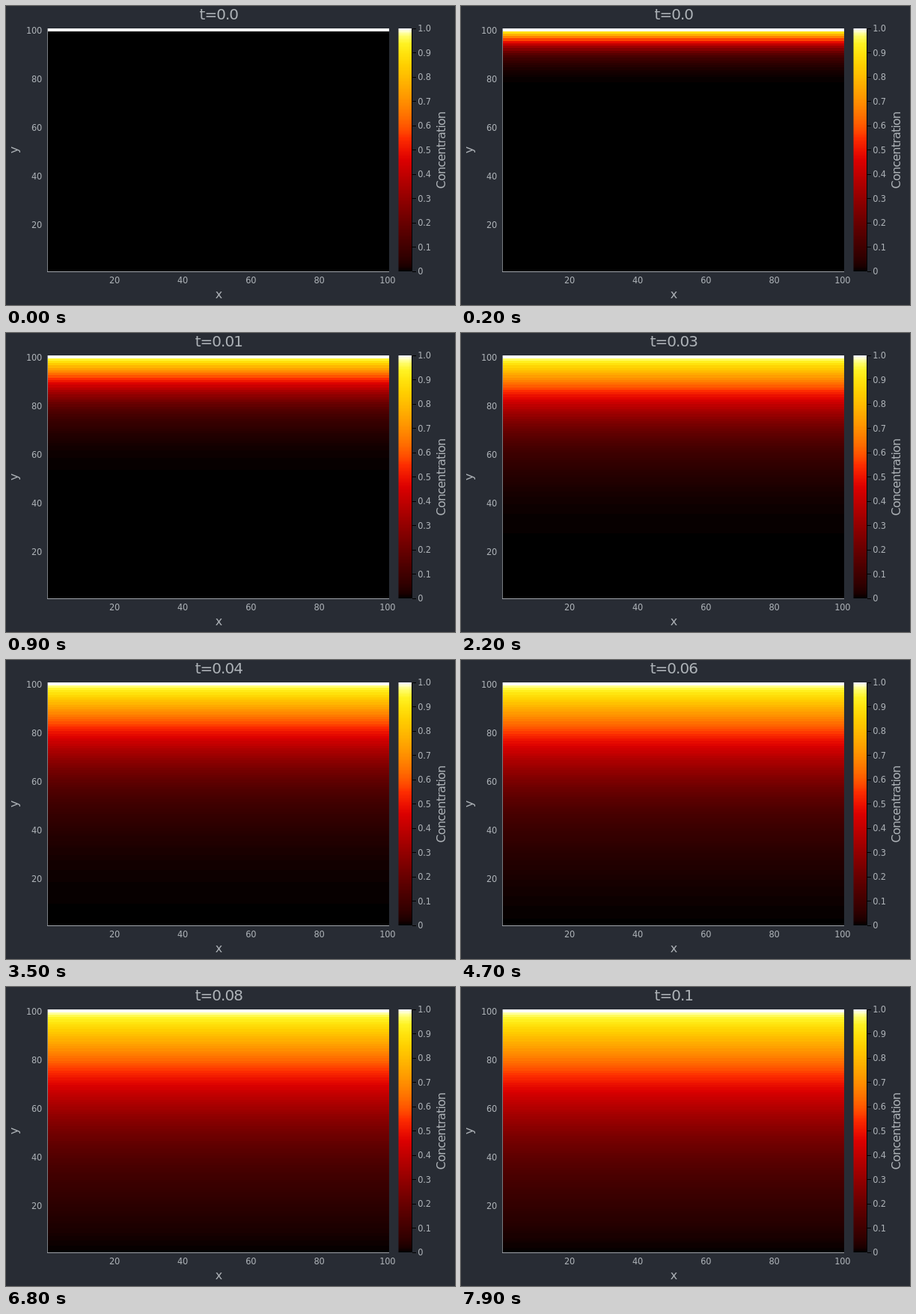
Write an HTML page with a canvas that moves like this. It is 600 px wide and 400 px high and loops after 8 s.

```html
<!DOCTYPE html>
<html lang="en">
<head>
<meta charset="utf-8">
<title>Diffusion</title>
<style>
  html, body { margin: 0; width: 100%; height: 100%; overflow: hidden; background: #282c34; }
  canvas, svg { position: absolute; left: 0; top: 0; width: 600px; height: 400px; }
  text { font-family: "DejaVu Sans", sans-serif; font-size: 11.4px; letter-spacing: -0.02em; fill: #adb2b7; }
  .guide { font-size: 16px; letter-spacing: -0.05em; }
  .title { font-size: 20px; letter-spacing: -0.05em; }
  .mid { text-anchor: middle; }
  .end { text-anchor: end; }
</style>
</head>
<body>
<canvas width="600" height="400"></canvas>
<svg viewBox="0 0 600 400">
  <path d="M55.5 30V355" stroke="#adb2b7" stroke-opacity="0.6"/>
  <path d="M55 355.5H512" stroke="#adb2b7" stroke-opacity="0.9"/>
  <path id="ticks" fill="none" stroke="#000"/>
  <text id="title" class="title mid" x="284.3" y="18"></text>
  <text class="guide mid" x="284" y="391">x</text>
  <text class="guide mid" transform="translate(16 193) rotate(-90)">y</text>
  <text class="guide mid" transform="translate(587 193) rotate(-90)">Concentration</text>
</svg>
<script>
const STEP = 100, FRAMES = 80, N = 100, SUBSTEPS = 50;
const LEFT = 56, RIGHT = 512, TOP = 30.4, HEIGHT = 325;
const svg = document.querySelector('svg');
const title = document.getElementById('title');
const ctx = document.querySelector('canvas').getContext('2d');

// Black-red-yellow-white ramp whose lightness rises evenly with the value.
const toLinear = c => {
  c /= 255;
  return c <= 0.04045 ? c / 12.92 : ((c + 0.055) / 1.055) ** 2.4;
};
const toByte = l => {
  l = Math.min(1, Math.max(0, l));
  return 255 * (l <= 0.0031308 ? 12.92 * l : 1.055 * l ** (1 / 2.4) - 0.055);
};
function lerpPoints(points, v) {
  const i = points.findIndex(p => v <= p[0]);
  if (i <= 0) return points[0][1];
  const [a, b] = [points[i - 1], points[i]];
  return a[1] + (b[1] - a[1]) * (v - a[0]) / (b[0] - a[0]);
}
const RED = [[0.45, 216], [0.5, 237], [0.55, 254], [0.6, 255], [1, 255]];
const BLUE = [[0.85, 0], [0.9, 13], [0.94, 36], [0.97, 105], [1, 255]];

function fire(v) {
  const L = v * 100;
  const Y = L > 8 ? ((L + 16) / 116) ** 3 : L / 903.3;
  if (v <= RED[0][0]) return [toByte(Y / 0.2126), 0, 0];
  const r = lerpPoints(RED, v), b = lerpPoints(BLUE, v);
  const g = toByte((Y - 0.2126 * toLinear(r) - 0.0722 * toLinear(b)) / 0.7152);
  return [r, g, b];
}
const palette = Array.from({ length: 256 }, (_, i) => `rgb(${fire(i / 255).map(Math.round)})`);
const colour = v => palette[Math.round(v * 255)];

// Explicit diffusion: fixed 1 at the top, fixed 0 at the bottom.
function diffuse(start) {
  let c = start;
  for (let s = 0; s < SUBSTEPS; s++) {
    const next = c.slice();
    for (let i = 1; i < N - 1; i++) next[i] = c[i] + 0.25 * (c[i - 1] - 2 * c[i] + c[i + 1]);
    c = next;
  }
  return c;
}
const states = [Array.from({ length: N }, (_, i) => i ? 0 : 1)];
while (states.length < FRAMES) states.push(diffuse(states[states.length - 1]));

// Each frame advances t by 0.00125; halves round to even.
function timeLabel(n) {
  const x = n / 8, low = Math.floor(x), rest = x - low;
  const h = rest === 0.5 ? low + low % 2 : Math.round(x);
  return 't=' + (h ? h / 100 : '0.0');
}

function addText(str, x, y, cls) {
  const el = document.createElementNS('http://www.w3.org/2000/svg', 'text');
  el.setAttribute('x', x);
  el.setAttribute('y', y);
  el.setAttribute('class', cls);
  el.textContent = str;
  svg.append(el);
}

function drawAxes() {
  for (let v = 20; v <= 100; v += 20) {
    addText(v, LEFT + (v - 0.5) * 4.56, 371, 'mid');
    addText(v, 48, TOP + (N + 0.5 - v) * 3.25 + 5, 'end');
  }
  let d = 'M542.5 30V355';
  for (let i = 0; i <= 10; i++) {
    const y = 355 - i * 32.5;
    addText(i ? (i / 10).toFixed(1) : '0', 550.3, y + 4.2, '');
    d += `M543 ${Math.floor(y) + 0.5}h5`;
  }
  document.getElementById('ticks').setAttribute('d', d);
  for (let y = 0; y < HEIGHT; y++) {
    ctx.fillStyle = colour(1 - y / (HEIGHT - 1));
    ctx.fillRect(524.5, 30 + y, 18, 1);
  }
}

function drawFrame(n) {
  const edge = i => Math.round(TOP + i * HEIGHT / N);
  states[n].forEach((v, i) => {
    ctx.fillStyle = colour(v);
    ctx.fillRect(LEFT, edge(i), RIGHT - LEFT, edge(i + 1) - edge(i));
  });
  title.textContent = timeLabel(n);
}

drawAxes();
drawFrame(0);
let shown = 0;
const begin = performance.now();
function tick() {
  const n = Math.floor((performance.now() - begin) / STEP) % FRAMES;
  if (n !== shown) drawFrame(shown = n);
  requestAnimationFrame(tick);
}
requestAnimationFrame(tick);
</script>
</body>
</html>
```
